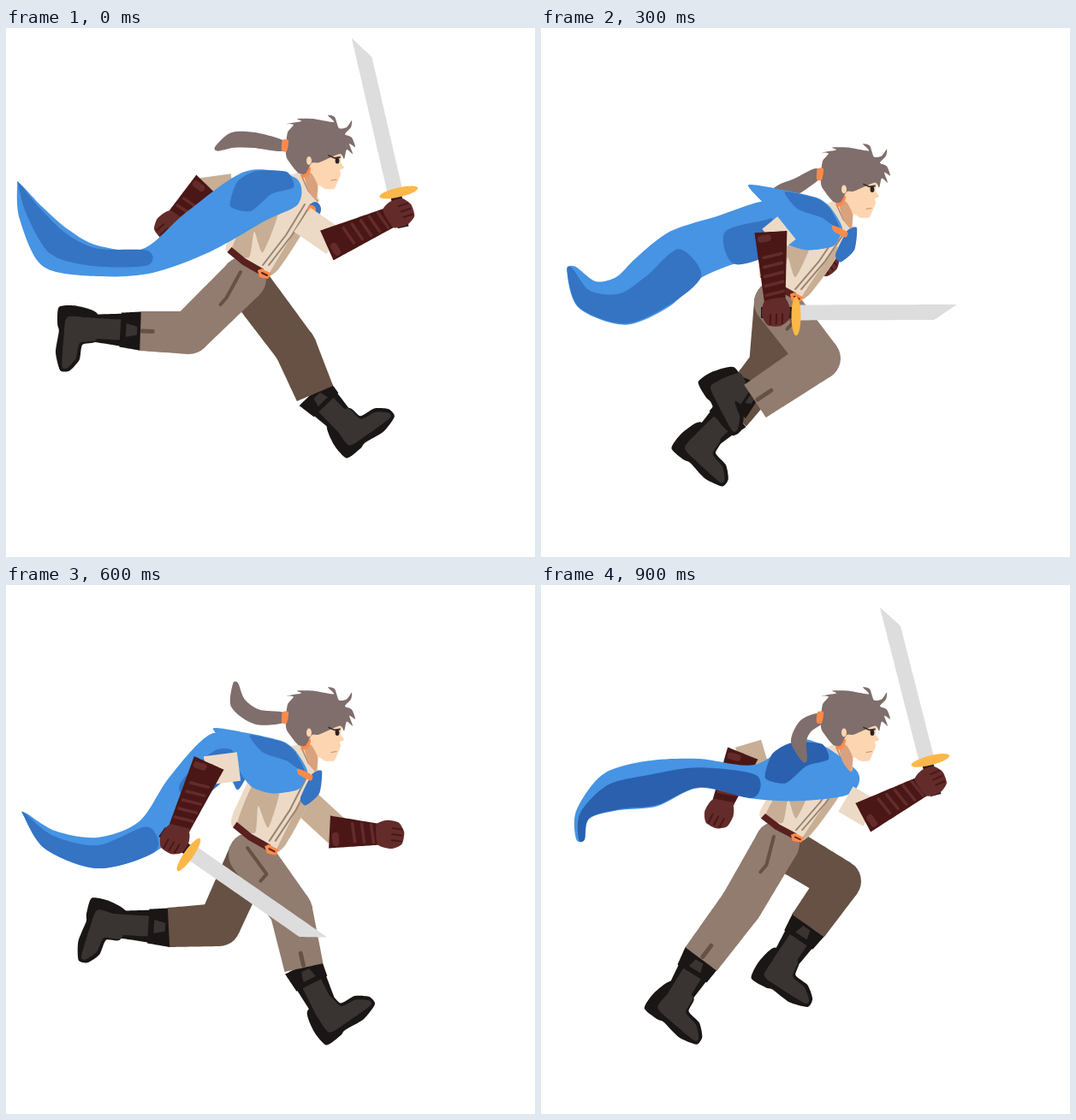
An HTML page with a canvas for the animation above (1000 ms loop, 618 px wide and 618 px high).

```html
<!DOCTYPE html>
<html lang="en">
<head>
<meta charset="utf-8">
<title>Running swordsman</title>
<style>
html,body{margin:0;width:100%;height:100%;overflow:hidden;background:#fff}
canvas{display:block;width:618px;height:618px}
</style>
</head>
<body>
<canvas id="c" width="618" height="618"></canvas>
<script>
const ctx = document.getElementById('c').getContext('2d');
const SKY = '#4694e3', MID = '#3573c3', DEEP = '#2a60ae';
const HAIR = '#7f6e6c', SKIN = '#fdd5b0', ORANGE = '#ff8a4a';
const SHIRT = '#ecdac6', SHADE = '#c7ae94', SEAM = '#9a8573', WINE = '#4a1716', ROSE = '#632c2b';
const BOOT = '#1a1615', SHINE = '#393332', PANTS = '#917c6f', DARK = '#665144';

const mix = (a, b, t) => a + (b - a) * t;
const mixAll = (a, b, t) => a.map((v, i) => mix(v, b[i], t));
const points = (s, size = 2) => {
  const v = s.split(' ').map(Number), out = [];
  while (v.length) out.push(v.splice(0, size));
  return out;
};

// Closed, slightly rounded outline through the points.
function shape(color, pts, k = 0.11) {
  if (typeof pts === 'string') pts = points(pts);
  const n = pts.length, p = i => pts[(i + n) % n];
  ctx.beginPath();
  ctx.moveTo(...pts[0]);
  for (let i = 0; i < n; i++) {
    const [a, b, c, d] = [p(i - 1), p(i), p(i + 1), p(i + 2)];
    ctx.bezierCurveTo(b[0] + (c[0] - a[0]) * k, b[1] + (c[1] - a[1]) * k,
      c[0] - (d[0] - b[0]) * k, c[1] - (d[1] - b[1]) * k, c[0], c[1]);
  }
  ctx.fillStyle = color;
  ctx.fill();
}

function line(color, width, s, cap = 'round') {
  ctx.beginPath();
  for (const p of typeof s === 'string' ? points(s) : s) ctx.lineTo(...p);
  ctx.strokeStyle = color;
  ctx.lineWidth = width;
  ctx.lineCap = cap;
  ctx.lineJoin = 'round';
  ctx.stroke();
}

function oval(color, x, y, rx, ry = rx) {
  ctx.beginPath();
  ctx.ellipse(x, y, rx, ry, 0, 0, 7);
  ctx.fillStyle = color;
  ctx.fill();
}

function placed(x, y, angle, draw) {
  ctx.save();
  ctx.translate(x, y);
  ctx.rotate(angle);
  draw();
  ctx.restore();
}

// Band along a spine of [x, y, half width], between two relative offsets.
function ribbon(color, spine, lo = -1, hi = 1) {
  const side = off => spine.map(([x, y, w], i) => {
    const a = spine[Math.max(0, i - 1)], b = spine[Math.min(spine.length - 1, i + 1)];
    const dx = b[0] - a[0], dy = b[1] - a[1], k = w * off / Math.hypot(dx, dy);
    return [x - dy * k, y + dx * k];
  });
  shape(color, [...side(lo), ...side(hi).reverse()], .15);
}

function resample(spine, n = 8) {
  return Array.from({ length: n }, (_, i) => {
    const t = i / (n - 1) * (spine.length - 1), j = Math.min(Math.floor(t), spine.length - 2);
    return mixAll(spine[j], spine[j + 1], t - j);
  });
}

function taper(color, [x, y], r, [u, v], q) {
  const a = Math.atan2(v - y, u - x), c = Math.sin(a), s = Math.cos(a);
  shape(color, [[x + c * r, y - s * r], [u + c * q, v - s * q], [u - c * q, v + s * q], [x - c * r, y + s * r]], 0);
}

// Five strides, two legs each: knee, hem, ankle, foot angle.
const stride = (head, hx, hy, tail, ...legs) => ({
  head, hx, hy,
  tail: points(tail).map((p, i) => [...p, [6, 9, 9, 3][i]]),
  legs: legs.map(s => points(s))
});
const strides = [
  stride(0, 0, 0, '324 138 290 131 265 131 246 141',
    '214 356 157 354 92 350 92', '338 373 361 427 397 464 -38'),
  stride(17.5, 8, 22, '324 155 293 154 271 138 268 115',
    '249 397 190 400 124 396 105', '333 380 348 447 374 499 -37'),
  stride(33.5, -5, 28, '324 170 296 169 276 150 279 128',
    '278 403 224 412 172 422 103', '320 388 291 450 268 505 0'),
  stride(33.5, -3, 28, '324 169 300 184 280 192 261 200',
    '325 386 250 436 222 418 60', '268 394 222 451 190 482 40'),
  stride(17.5, -2, 9, '327 155 309 165 301 183 308 205',
    '349 346 312 398 281 444 30', '234 374 187 437 158 484 38')
];

// near: shoulder, elbow, blade base, blade angle; far: shoulder, elbow, fist
const pose = (cape, near, far, hue, back, lo, hi) => ({
  cape: points(cape, 3), near: near.split(' ').map(Number), far: far.split(' ').map(Number), hue, back, lo, hi
});
const poses = [];
poses[0] = pose('15 183 2 29 216 15 58 257 26 105 272 18 165 272 15 225 238 27 292 196 31 340 190 15',
  '346 224 384 250 454 189 -103', '265 187 229 192 190 232', MID, false, -.8, .35);
poses[2] = pose('20 311 4 35 336 13 85 340 20 136 305 27 158 246 23 200 218 17 260 224 18 310 229 27 354 239 11',
  '312 272 300 306 389 338 -42', '275 255 248 256 226 318', MID, false, -.3, .95);
poses[4] = pose('50 252 7 72 300 29 108 317 43 160 299 46 215 252 38 256 205 36',
  '262 195 238 190 215 287 41.7', '350 268 395 270 437 228', DEEP, true, -.4, 1);
poses[5] = pose('17 183 2 42 222 12 75 266 28 116 279 39 182 260 30 225 205 34 262 182 30',
  '268 184 248 181 208 268 51', '360 226 400 231 454 208', DEEP, true, -.5, 1);
poses[6] = pose('22 268 2 52 298 12 108 313 18 168 292 20 207 238 21 250 200 28 282 212 28',
  '272 212 233 217 219 314 34.8', '350 254 388 289 449 292', MID, true, -.5, 1);
poses[8] = pose('26 313 6 40 282 14 72 274 32 115 278 36 180 278 17 232 257 13 285 239 32 350 243 32',
  '342 291 354 307 450 291 -75.5', '265 235 243 266 225 320', DEEP, false, -.65, .95);
poses[9] = pose('46 297 5 49 268 9 82 242 23 130 232 27 185 220 17 250 230 20 308 216 36 365 230 14',
  '356 250 385 267 450 202 -104.3', '262 197 232 206 207 268', DEEP, false, -.4, .95);

function between(i, t, dip) {
  const a = poses[i - 1], b = poses[i + 1];
  const cape = resample(a.cape), next = resample(b.cape);
  const near = mixAll(a.near, b.near, t);
  near[5] += dip;
  poses[i] = { ...a, back: i > 1, near, far: mixAll(a.far, b.far, t), cape: cape.map((p, j) => mixAll(p, next[j], t)) };
}
between(1, .5, 0);
between(3, .5, 20);
between(7, .4, 20);

function leg(s, [knee, hem, ankle, [deg]], near) {
  const tone = near ? PANTS : DARK, hip = [278 + s.hx, 293 + s.hy];
  const along = t => mixAll(hem, ankle, t);
  taper(BOOT, hem, 21, ankle, 15);
  placed(...ankle, deg * Math.PI / 180, () => {
    shape(BOOT, '-17 -14 15 -14 20 2 38 5 51 16 51 27 30 33 5 30 -3 32 -23 31 -25 10');
    shape(SHINE, '-8 -16 14 -14 18 5 36 9 48 19 46 25 10 24 -12 20');
  });
  taper(SHINE, along(.3), 12, ankle, 12);
  taper(BOOT, along(-.05), 23, along(.36), 20);
  taper(SHINE, along(.06), 5, along(.26), 8);
  oval(tone, ...hip, 26);
  taper(tone, hip, 26, knee, 25);
  oval(tone, ...knee, 25);
  taper(tone, knee, 25, hem, 23);
  if (near) {
    const [x, y] = mixAll(hip, knee, .35);
    line(DARK, 4, [[hip[0] - 4, hip[1] - 8], [x + 2, y], [x - 5, y + 8]]);
    line(DARK, 5, [mixAll(knee, hem, .75), mixAll(knee, hem, .96)]);
  }
}

function arm(sx, sy, ex, ey, fx, fy, sleeve) {
  line(sleeve, 34, [[sx, sy], [ex, ey]], 'butt');
  const L = Math.hypot(fx - ex, fy - ey);
  placed(ex, ey, Math.atan2(fy - ey, fx - ex), () => {
    taper(WINE, [-10, 0], 19, [L - 10, 0], 12);
    for (let x = 16; x < L - 14; x += 11) line(ROSE, 3.5, [[x, -11], [x + 4, 10]]);
    line(ROSE, 8, '-3 4 -2 12');
    placed(L, 0, 0, () => {
      shape(ROSE, '-17 -11 -5 -17 9 -15 16 -4 14 10 2 16 -14 12');
      for (const y of [-8, -1, 6]) line(WINE, 2, [[2, y], [13, y + 1]]);
    });
  });
}

function sword(x, y, a) {
  placed(x, y, a, () => {
    line('#241a1a', 13, '-45 0 -4 0', 'butt');
    shape('#dddddd', '0 -9 184 -9 157 9 0 9', 0);
    oval('#fdb748', -4, 4, 5.5, 23);
  });
}

// The shirt shears and stretches between the shoulders and the hips.
function torso({ head, hx, hy }) {
  const d = 1 + (hy - head) / 100;
  ctx.save();
  ctx.transform(1, 0, hx / 100, d, -1.8 * hx, head + 180 * (1 - d));
  shape(SHIRT, '300 182 345 170 362 193 361 210 347 238 327 270 309 290 290 284 257 259 272 225');
  shape(SHADE, '292 205 318 214 300 262 290 238 284 268 264 258');
  shape(SHADE, '345 226 348 236 318 282 308 286');
  for (const x of [0, -7]) line(SEAM, 2, [[356 + x, 206], [334 + x, 242], [307 + x, 277]]);
  line('#58201f', 8, '261 259 278 273 299 285', 'butt');
  shape(ORANGE, '294 283 299 281 310 287 306 293 296 291', 0);
  line('#58201f', 2, '299 286 305 289');
  ctx.restore();
}

function face() {
  shape(SKIN, '346 158 380 140 392 147 391 157 395 163 390 166 391 171 386 183 383 188 373 188 365 184 363 200 350 182');
  shape('#d9a17d', '348 168 357 170 364 184 362 201 352 188');
  shape(ORANGE, '346 166 356 163 353 173 345 175');
  shape(HAIR, '327 138 329 122 336 113 328 112 345 109 340 106 358 106 383 110 376 102 384 104 389 117 398 116 404 108 403 116 396 124 404 128 408 139 401 135 405 147 398 142 395 153 390 147 366 157 357 158 350 170 341 169 328 152');
  oval(SKIN, 354, 155, 3, 5);
  line('#3f302f', 1.8, '377 149 384 152 390 151');
  oval('#2c2222', 387, 155, 2.4, 3.6);
  line('#c98f70', 1.2, '380 178 386 177');
}

function collar() {
  shape(SHIRT, '337 173 345 170 366 200 359 206 350 196');
  line(SEAM, 1.5, '345 172 353 190 364 202');
}

function cape({ cape, hue, lo, hi }) {
  ribbon(SKY, cape);
  ribbon(hue, cape.slice(0, hue === DEEP && lo > -.6 ? -2 : -3), lo, hi);
}

function mantle() {
  shape(SKY, '242 150 285 156 323 165 338 176 352 200 342 221 312 226 288 219 274 202 266 178');
  shape(MID, '285 158 323 166 338 178 350 203 328 188 300 178');
  shape(MID, '358 203 369 200 366 226 350 240 344 231');
}

function drawFrame(i) {
  const p = poses[i], s = strides[i % 5];
  const [near, far] = i < 5 ? s.legs : [s.legs[1], s.legs[0]];
  const [sx, sy, ex, ey, bx, by, deg] = p.near;
  const a = deg * Math.PI / 180;
  const lifted = draw => placed(0, s.head, 0, draw);

  ctx.fillStyle = '#fff';
  ctx.fillRect(0, 0, 618, 618);
  if (p.back) {
    if (p.hue === DEEP) ribbon(DEEP, p.cape);
    cape(p);
    ribbon(p.hue, p.cape.slice(-3), -.3, 1);
  }
  arm(...p.far, SHADE);
  leg(s, far, false);
  leg(s, near, true);
  torso(s);
  lifted(collar);
  if (p.back) {
    ribbon(HAIR, s.tail);
    lifted(mantle);
  } else {
    lifted(() => oval(MID, 361, 212, 7, 9));
    cape(p);
    lifted(() => shape(p.hue, '270 180 292 167 328 168 336 186 310 194 286 214 262 208'));
    ribbon(HAIR, s.tail);
  }
  lifted(() => {
    face();
    shape(ORANGE, '323 131 330 131 328 144 322 143');
    if (p.back) shape(ORANGE, '340 197 347 199 358 205 356 211 342 204');
    else if (i < 9) oval(ORANGE, 357, 212, 5, 5);
  });
  sword(bx, by, a);
  arm(sx, sy, ex, ey, bx - 28 * Math.cos(a), by - 28 * Math.sin(a), SHIRT);
}

const start = performance.now();
function tick() {
  const t = Math.max(0, performance.now() - start) % 1000;
  drawFrame(Math.floor(t / 100));
  requestAnimationFrame(tick);
}
tick();
</script>
</body>
</html>
```
